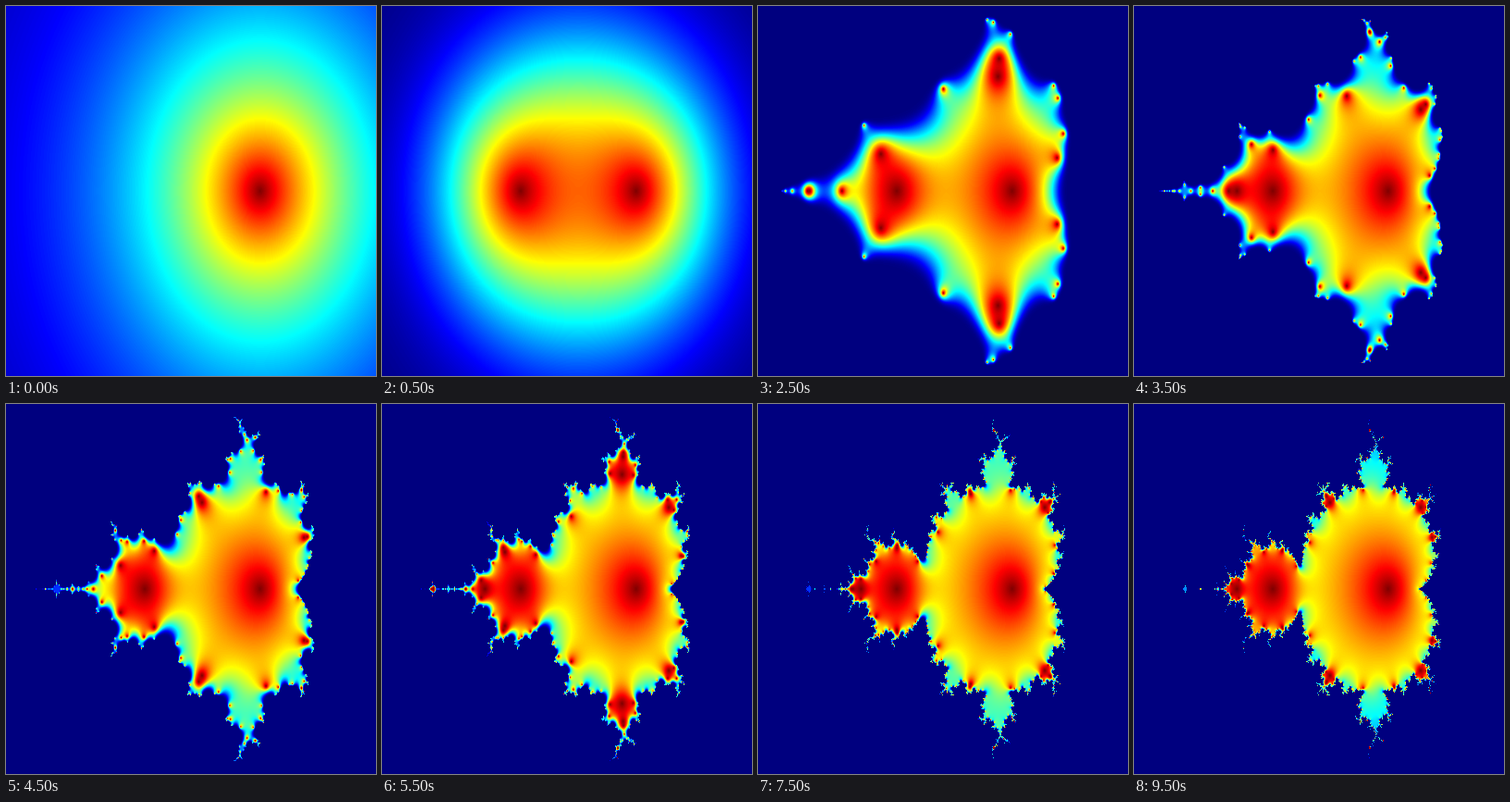
Write an HTML page with a canvas that moves like this. It is 400x400 px and loops after 10000 ms.

```html
<!DOCTYPE html>
<html lang="en">
<head>
<meta charset="utf-8">
<title>Mandelbrot iterations</title>
<style>
  html, body { margin: 0; width: 100%; height: 100%; overflow: hidden; background: #00007f; }
  canvas { display: block; width: 100vw; height: 100vh; }
</style>
</head>
<body>
<canvas id="stage" width="400" height="400"></canvas>
<script>
const SIZE = 400, STEPS = 20, STEP_MS = 500;
const ctx = document.getElementById('stage').getContext('2d');

// Jet colour ramp with 256 levels
const stops = [
  [0, 0, 127], [0, 0, 255], [0, 127, 255], [0, 255, 255], [127, 255, 127],
  [255, 255, 0], [255, 127, 0], [255, 0, 0], [127, 0, 0]
];
const palette = Array.from({ length: 256 }, (_, level) => {
  const pos = level / 255 * (stops.length - 1);
  const i = Math.min(Math.floor(pos), stops.length - 2);
  return stops[i].map((v, c) => Math.round(v + (stops[i + 1][c] - v) * (pos - i)));
});

const spread = (from, to, i) => from + (to - from) * i / (SIZE - 1);
const images = Array.from({ length: STEPS }, () => ctx.createImageData(SIZE, SIZE));

function paint(image, offset, level) {
  const [r, g, b] = palette[level];
  image.data[offset] = r;
  image.data[offset + 1] = g;
  image.data[offset + 2] = b;
  image.data[offset + 3] = 255;
}

// Each picture shows exp(-|z|) after one more round of z = z² + c
for (let py = 0; py < SIZE; py++) {
  const cy = spread(-1.2, 1.2, py);
  for (let px = 0; px < SIZE; px++) {
    const cx = spread(-2.2, 1, px);
    const offset = (py * SIZE + px) * 4;
    let x = 0, y = 0, escaped = false;
    for (let k = 0; k < STEPS; k++) {
      let level = 0;
      if (!escaped) {
        [x, y] = [x * x - y * y + cx, 2 * x * y + cy];
        const size = Math.sqrt(x * x + y * y);
        escaped = size > 50;
        level = Math.round(255 * Math.exp(-size));
      }
      paint(images[k], offset, level);
    }
  }
}

let shown = -1;
function draw() {
  const step = Math.floor(performance.now() / STEP_MS) % STEPS;
  if (step !== shown) {
    ctx.putImageData(images[step], 0, 0);
    shown = step;
  }
  requestAnimationFrame(draw);
}
draw();
</script>
</body>
</html>
```
